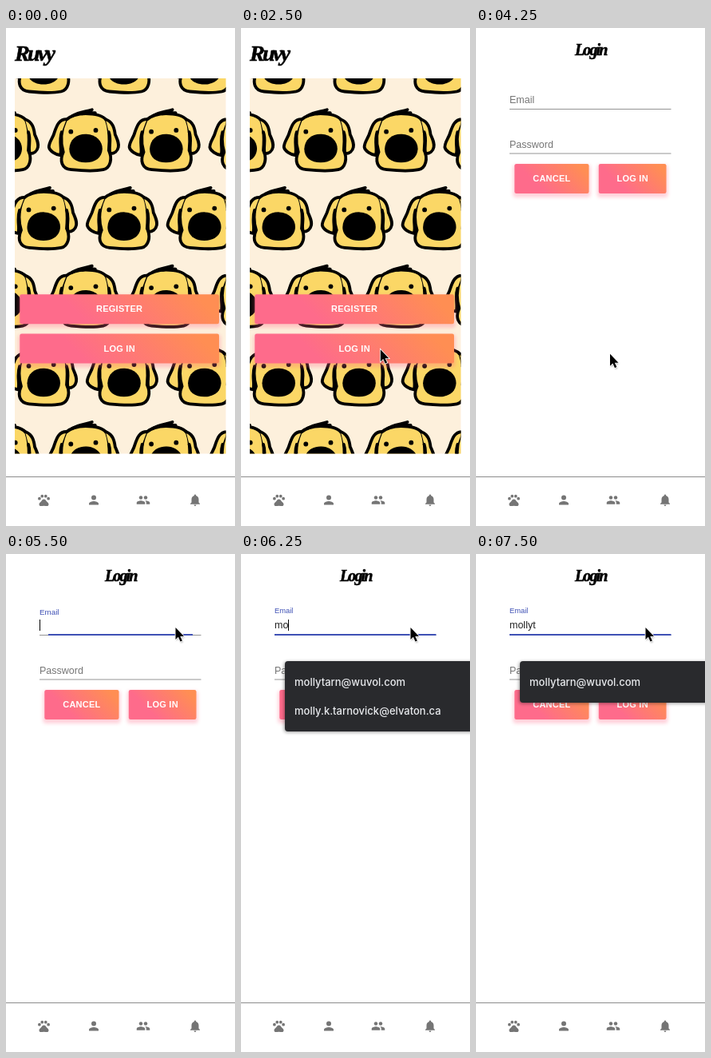
These frames come from a looping animation (287x623 px, 8 s). An HTML page:

```html
<!DOCTYPE html>
<html lang="en">
<head>
<meta charset="utf-8">
<title>Login flow</title>
<style>
  html, body { margin: 0; width: 100%; height: 100%; overflow: hidden; background: #fff; }
  svg { display: block; width: 100vw; height: 100vh; }
  text { font-family: "Liberation Sans", Arial, sans-serif; font-size: 12.5px; white-space: pre; }
  .script { font: italic bold 28px "Liberation Serif", serif; letter-spacing: -2.7px; stroke: #000; stroke-width: .6px; }
  .script.small { font-size: 20px; letter-spacing: -1.9px; }
  .button { font-weight: bold; font-size: 11px; letter-spacing: .25px; fill: #fff; text-anchor: middle; }
  .hint { fill: #757575; }
  .option { font: 500 13px Inter, Roboto, sans-serif; fill: #e8eaed; }
</style>
</head>
<body>
<svg id="stage" viewBox="0 0 287 623" xmlns="http://www.w3.org/2000/svg">
  <defs>
    <clipPath id="photo"><rect x="11" y="63" width="264.5" height="469.5"/></clipPath>
    <filter id="glow" x="-20%" y="-60%" width="140%" height="220%"><feGaussianBlur stdDeviation="2.3"/></filter>
    <filter id="soft" x="-50%" y="-50%" width="200%" height="200%"><feGaussianBlur stdDeviation="1"/></filter>
    <g id="dog" fill="#fbd766" stroke="#000" stroke-width="3.8" stroke-linecap="round" stroke-linejoin="round">
      <path d="M-25 -35C-18 -41 -10 -43 0 -43C12 -43 21 -41 26 -35C31 -22 30 -8 29 3C34 13 31 25 22 27C12 29 -8 28 -18 27C-30 26 -33 16 -28 5C-32 -8 -31 -22 -25 -35Z"/>
      <path d="M-24 -36C-33 -36 -36 -29 -39 -20C-41 -12 -46 -8 -46 -1C-45 4 -38 8 -32 9C-29 3 -34 -8 -30 -20"/>
      <path d="M25 -36C34 -33 36 -25 37 -17C40 -10 42 -6 41 -1C40 4 36 7 31 7C28 0 33 -9 29 -20"/>
      <path fill="none" d="M-17 -40C-7 -46 0 -45 8 -48M-4 -43Q4 -45 12 -44"/>
      <g fill="#000" stroke="none">
        <path d="M-20.5 1C-20 -11 -11 -18 1 -17.5C13 -17 21 -9 21 1C20.5 12 12 18 0 18C-12 18 -20.5 12 -20.5 1Z"/>
        <circle cx="-18.5" cy="-20.5" r="2.9"/><circle cx="12.7" cy="-22.3" r="2.9"/>
      </g>
    </g>
  </defs>
  <rect width="287" height="623" fill="#fff"/>

  <g id="home">
    <text class="script" x="11" y="41">Ruvy</text>
    <g id="pattern" clip-path="url(#photo)"><rect x="11" y="63" width="265" height="470" fill="#fdf0dc"/></g>
    <g id="homeButtons"></g>
    <circle id="ripple" cx="174" cy="407" r="5" fill="#fff" opacity=".2"/>
  </g>

  <g id="login">
    <text class="script small" x="124" y="33.5">Login</text>
    <path d="M42 101.5H244.5M42 157H244.5" stroke="#949494"/>
    <text id="email" x="42">Email</text>
    <text class="hint" x="42" y="149.5">Password</text>
    <path id="focus" stroke="#3f51b5" stroke-width="2"/>
    <text id="typed" x="42" y="93.3" fill="#212121"></text>
    <rect id="caret" y="82" width="1" height="14"/>
    <g id="loginButtons"></g>
    <g id="menu">
      <rect id="menuShadow" x="54" y="135" width="250" rx="4" opacity=".4" filter="url(#glow)"/>
      <rect id="menuBox" x="55" y="134" width="250" rx="4" fill="#292a2d"/>
      <text class="option" x="67" y="165">mollytarn@wuvol.com</text>
      <text class="option" id="second" x="67" y="201">molly.k.tarnovick@elvaton.ca</text>
    </g>
  </g>

  <path d="M0 561.5H287" stroke="#8c8c8c"/>
  <g id="nav" fill="#757575"></g>

  <g id="pointer">
    <path d="M0 0V15L3.4 11.8L6 17.5L8.4 16.4L5.8 11H10.5Z" transform="translate(.8 1.5)" opacity=".4" filter="url(#soft)"/>
    <path d="M0 0V15L3.4 11.8L6 17.5L8.4 16.4L5.8 11H10.5Z" stroke="#fff" stroke-width="1.6" paint-order="stroke"/>
  </g>
</svg>
<script>
const LOOP = 8000;
const $ = id => document.getElementById(id);
const add = (id, markup) => $(id).insertAdjacentHTML("beforeend", markup);
const show = (id, on) => $(id).setAttribute("display", on ? "inline" : "none");
const set = (id, attrs) => {
  for (const key in attrs) $(id).setAttribute(key, attrs[key]);
};

// Rows of heads, every other one shifted by half a step
for (let row = 0; row < 6; row++) {
  for (let col = -1; col < 4; col++) {
    const x = (row % 2 ? -1 : 47) + col * 100.8;
    add("pattern", `<use href="#dog" x="${x}" y="${52.5 + row * 97.7}"/>`);
  }
}

// 45 degree gradient spanning the box corner to corner
function button(parent, label, x, y, w) {
  const h = 37, cx = x + w / 2, cy = y + h / 2, reach = (w + h) / 4;
  const id = "fill" + parent + x + Math.round(y);
  add(parent, `
    <linearGradient id="${id}" gradientUnits="userSpaceOnUse"
      x1="${cx - reach}" y1="${cy + reach}" x2="${cx + reach}" y2="${cy - reach}">
      <stop offset=".3" stop-color="#fe6b8b"/><stop offset=".9" stop-color="#ff8e53"/>
    </linearGradient>
    <rect x="${x - 2}" y="${y + 1}" width="${w + 4}" height="${h + 4}" rx="4"
      fill="#ff6987" opacity=".3" filter="url(#glow)"/>
    <rect x="${x}" y="${y}" width="${w}" height="${h}" rx="2.3" fill="url(#${id})"/>
    <text class="button" x="${cx}" y="${cy + 3.7}">${label}</text>`);
}
button("homeButtons", "REGISTER", 17.3, 333.2, 249.7);
button("homeButtons", "LOG IN", 17.3, 382.5, 249.7);
button("loginButtons", "CANCEL", 48.3, 170, 93.2);
button("loginButtons", "LOG IN", 153.8, 170, 84.7);

const dot = (x, y, r) => `<circle cx="${x}" cy="${y}" r="${r}"/>`;
const shape = d => `<path d="${d}"/>`;
const icons = [
  [47.5, dot(4.5, 9.5, 2.5) + dot(9, 5.5, 2.5) + dot(15, 5.5, 2.5) + dot(19.5, 9.5, 2.5) +
    shape("M12 10.5C9.5 10.5 8.5 13 6.7 14.9C5.3 16.3 3.7 17.7 4 19.6C4.5 21.3 5.5 22 6.6 22C8 22 10 21.5 12 21.5S16 22 17.4 22C18.5 22 19.5 21.3 20 19.6C20.3 17.7 18.7 16.3 17.3 14.9C15.5 13 14.5 10.5 12 10.5Z")],
  [110, dot(12, 8, 4) + shape("M12 14c-2.7 0-8 1.3-8 4v2h16v-2c0-2.7-5.3-4-8-4z")],
  [172, dot(8, 8, 3) + dot(16, 8, 3) +
    shape("M8 13c-2.3 0-7 1.2-7 3.5V19h14v-2.5C15 14.2 10.3 13 8 13zM16 13l-1 .1c1.2.8 2 2 2 3.4V19h6v-2.5c0-2.3-4.7-3.5-7-3.5z")],
  [237, shape("M12 22c1.1 0 2-.9 2-2h-4c0 1.1.9 2 2 2zM18 16v-5c0-3.1-1.6-5.6-4.5-6.3V4a1.5 1.5 0 0 0-3 0v.7C7.6 5.4 6 7.9 6 11v5l-2 2v1h16v-1z")]
];
for (const [x, body] of icons) {
  add("nav", `<g transform="translate(${x - 9} 581.5) scale(.75)">${body}</g>`);
}

// Each list holds [start time, value...]; the last started entry applies
const moves = [
  [1500, 234.5, 474], [1750, 192, 429], [2000, 176, 403.5], [2250, 173, 400.5],
  [2500, 174.8, 402.2], [3250, 171, 405.5], [3500, 168, 408.5], [3750, 168, 407.7],
  [4500, 196, 376], [4750, 215, 148], [5000, 214.5, 104.5], [5250, 212.5, 92]
];
const typing = [[0, ""], [6250, "mo"], [6500, "moll"], [6750, "molly"], [7000, "mollyt"]];
const blinks = [[0, false], [5500, true], [6000, false], [6250, true], [7500, false]];
const at = (list, t) => list.filter(entry => entry[0] <= t).pop();

function draw(t) {
  const home = t < 4250, focused = t >= 5500, settled = t >= 5750;
  show("home", home);
  show("login", !home);
  show("ripple", t >= 4000);

  const move = at(moves, t);
  show("pointer", move);
  if (move) set("pointer", { transform: `translate(${move[1]} ${move[2]})` });

  set("email", { y: settled ? 74.2 : focused ? 76.3 : 93.6, fill: focused ? "#3f51b5" : "#757575" });
  $("email").style.fontSize = (settled ? 9.4 : focused ? 9.8 : 12.5) + "px";
  show("focus", focused);
  set("focus", { d: settled ? "M42 101H244.5" : "M53 101H234" });

  const text = at(typing, t)[1];
  $("typed").textContent = text;
  show("caret", at(blinks, t)[1]);
  const width = text && !home ? $("typed").getComputedTextLength() : 0;
  set("caret", { x: 42 + Math.round(width) });

  const two = t < 7000, height = two ? 88 : 52;
  show("menu", text);
  show("second", two);
  set("menuBox", { height });
  set("menuShadow", { height });
}

const start = performance.now();
function tick() {
  draw((performance.now() - start) % LOOP);
  requestAnimationFrame(tick);
}
tick();
</script>
</body>
</html>
```
